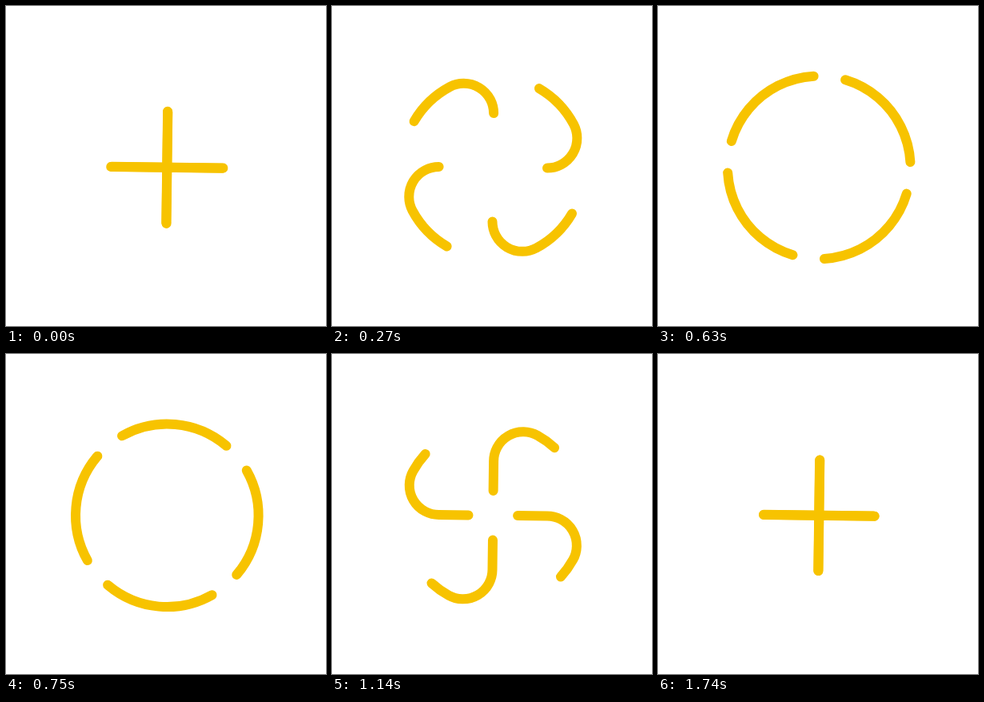
An HTML page for the animation above (2360 ms loop, 400 by 400 pixels).

```html
<!DOCTYPE html>
<html lang="en">
<head>
<meta charset="utf-8">
<title>Loader</title>
<style>
  html, body { margin: 0; width: 100%; height: 100%; overflow: hidden; background: #fff; }
  svg { display: block; width: 100vw; height: 100vh; }
</style>
</head>
<body>
<svg viewBox="0 0 400 400">
  <defs>
    <!-- up the bar, out onto the ring, once around, back down the bar -->
    <path id="track" d="M-1 69.3 L.8 -67.8
      A37.4 37.4 0 0 0 -54.1 -100.7
      A114.3 114.3 0 1 0 55.4 -99.96
      A36.8 36.8 0 0 0 .8 -67.8
      L-1 69.3"/>
  </defs>
  <g id="strokes" transform="translate(201.3 201.8)" fill="none" stroke="#f7c300"
     stroke-width="12" stroke-linecap="round" stroke-dasharray="139.5 2000">
    <use href="#track"/>
    <use href="#track" transform="rotate(90)"/>
    <use href="#track" transform="rotate(180)"/>
    <use href="#track" transform="rotate(270)"/>
  </g>
</svg>
<script>
const LOOP = 2360, STEP = 30;
const strokes = document.getElementById('strokes');

// [time in ms, distance of the tail along the track, speed in px/ms]
const keys = [
  [0, 0, 0],
  [270, 137, .9],
  [630, 523, .9],
  [900, 698, .48],
  [1140, 791, .38],
  [1410, 892, .2]
];

// Cubic Hermite between keys, resting after the last one
function travel(t) {
  const i = keys.findIndex(k => k[0] > t);
  if (i < 0) return keys[keys.length - 1][1];
  const [t0, s0, v0] = keys[i - 1], [t1, s1, v1] = keys[i];
  const d = t1 - t0, u = (t - t0) / d, w = 1 - u;
  return s0 * w * w * (1 + 2 * u) + s1 * u * u * (3 - 2 * u)
       + d * u * w * (v0 * w - v1 * u);
}

const start = performance.now();
function draw() {
  const t = (performance.now() - start) % LOOP;
  strokes.setAttribute('stroke-dashoffset', -travel(Math.floor(t / STEP) * STEP));
  requestAnimationFrame(draw);
}
draw();
</script>
</body>
</html>
```
